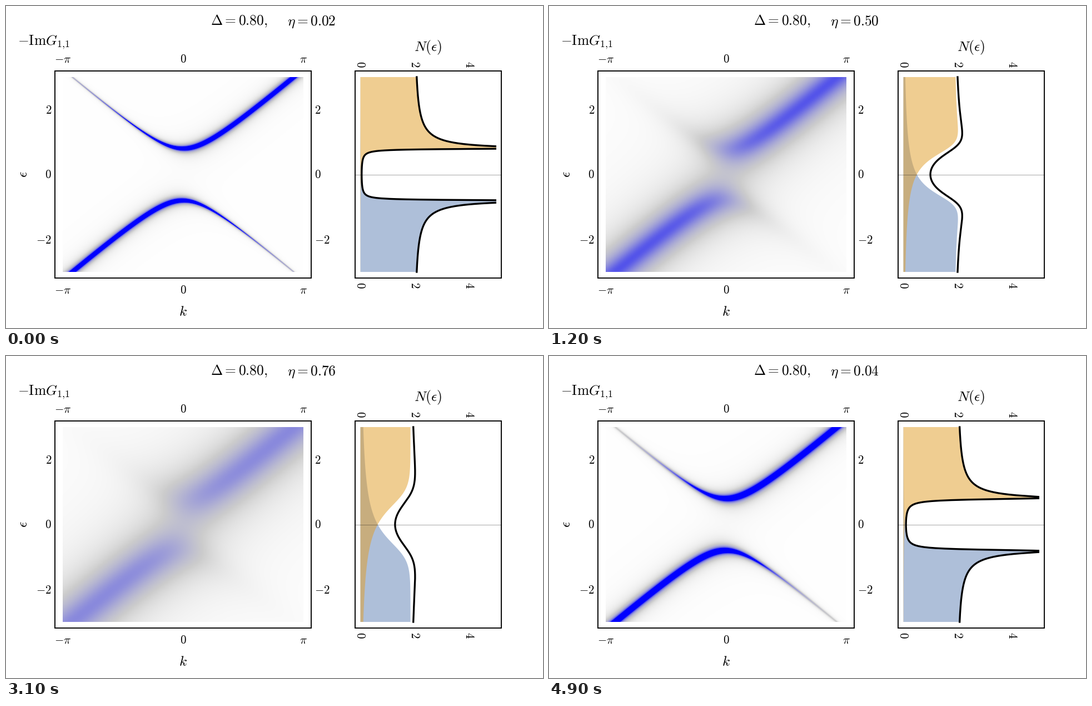
Write a matplotlib script that moves like this. It is 966x580 px and loops after 5000 ms.

```python
import numpy as np
import matplotlib.pyplot as plt
from matplotlib.animation import FuncAnimation
from matplotlib.patches import Polygon, Rectangle

plt.rcParams["mathtext.fontset"] = "cm"

W, H, DPI = 966, 580, 100
PT = 72 / DPI                      # points per pixel
FRAMES, INTERVAL = 50, 100
DELTA = 0.8
K_CUT = 3 * np.pi                  # momentum cutoff of the density of states

# pixel geometry
MAP_L, MAP_R, TOP, BOTTOM = 102, 535, 128, 479
MID = (TOP + BOTTOM) / 2
E_SCALE = (BOTTOM - TOP) / 6
DOS_X0, DOS_SCALE, DOS_MAX = 637.5, 48.9, 5

BLUE = (0.368, 0.507, 0.710)
ORANGE = (0.881, 0.611, 0.142)


def eta_at(i):
    return 0.02 + 0.04 * i if i < 25 else 1.0 - 0.04 * (i - 25)


# momentum / energy grid, one sample per pixel
cols, rows = MAP_R - MAP_L, BOTTOM - TOP
k_map = ((np.arange(cols) + 0.5) / cols * 2 - 1) * np.pi
e_map = (3 - (np.arange(rows) + 0.5) / E_SCALE)[:, None]

energies = np.linspace(-3, 3, 801)
dk = K_CUT / 2000
band = np.hypot((np.arange(2000) + 0.5) * dk, DELTA)
detuning2 = (energies[:, None] - band) ** 2


def spectral_image(eta):
    z = e_map + 1j * eta
    a = -((z + k_map) / (z ** 2 - k_map ** 2 - DELTA ** 2)).imag
    stops = [0, 0.45, 3]
    grey = np.interp(a, stops, [1, 0.8, 0])
    blue = np.interp(a, stops, [1, 0.8, 1])
    return np.dstack([grey, grey, blue])


def upper_band_dos(eta):
    return 2 * dk / np.pi * (eta / (detuning2 + eta ** 2)).sum(axis=1)


def dos_points(density):
    return np.column_stack([DOS_X0 + DOS_SCALE * density,
                            MID - E_SCALE * energies])


def fill_points(density):
    edge = dos_points(density)
    return np.vstack([[DOS_X0, BOTTOM], edge, [DOS_X0, TOP]])


fig = plt.figure(figsize=(W / DPI, H / DPI), dpi=DPI, facecolor="white")
ax = fig.add_axes([0, 0, 1, 1])


def label(x, y, text, size=21, ha="center", rotation=0):
    return ax.text(x, y, f"${text}$", fontsize=size * PT, ha=ha,
                   va="baseline", rotation=rotation, rotation_mode="anchor")


image = ax.imshow(spectral_image(eta_at(0)), interpolation="nearest",
                  extent=(MAP_L, MAP_R, BOTTOM, TOP), aspect="auto")
ax.set_xlim(0, W)
ax.set_ylim(H, 0)
ax.axis("off")

# everything in the right panel is cut off at the largest density
window = Rectangle((600, 100), DOS_X0 + DOS_SCALE * DOS_MAX + 0.3 - 600, 400,
                   transform=ax.transData)


def add_fill(color):
    patch = Polygon([[0, 0], [1, 0], [1, 1]], facecolor=color, alpha=0.5,
                    linewidth=0, zorder=2)
    ax.add_patch(patch)
    patch.set_clip_path(window)
    return patch


lower_fill = add_fill(BLUE)
upper_fill = add_fill(ORANGE)
ax.plot([628, 891], [MID, MID], color="black", alpha=0.34, lw=PT, zorder=3)
curve, = ax.plot([], [], color="black", lw=3.3 * PT, zorder=4,
                 solid_capstyle="projecting", solid_joinstyle="round")
curve.set_clip_path(window)

for left, right in [(88, 549), (627.5, 891)]:
    ax.add_patch(Rectangle((left, 117), right - left, 373, fill=False,
                           edgecolor="black", lw=1.9 * PT, zorder=5))

# labels
label(368, 34.5, r"\Delta = 0.80,", 25.5, "left")
eta_text = label(506, 34.5, "", 25.5, "left")
label(21, 70.5, r"-\mathrm{Im}G_{1{,}1}", 25.5, "left")
label(759, 81, r"N(\epsilon)", 25.5)
label(318, 558, "k", 25.5)
label(37.5, MID, r"\epsilon", 25.5, rotation=90)

for baseline in (102, 518):
    for x, text in [(102, r"-\pi"), (318.5, "0"), (534.5, r"\pi")]:
        label(x, baseline, text)
for value in (-2, 0, 2):
    y = MID - E_SCALE * value + 7
    label(82, y, value, ha="right")
    label(555, y, value, ha="left")
for value in (0, 2, 4):
    for y in (105, 503):
        label(DOS_X0 + DOS_SCALE * value - 6.5, y, value, rotation=-90)


def update(i):
    eta = eta_at(i)
    image.set_data(spectral_image(eta))
    upper = upper_band_dos(eta)
    lower = upper[::-1]
    upper_fill.set_xy(fill_points(upper))
    lower_fill.set_xy(fill_points(lower))
    curve.set_data(*dos_points(upper + lower).T)
    eta_text.set_text(rf"$\eta = {eta:.2f}$")
    return image, upper_fill, lower_fill, curve, eta_text


anim = FuncAnimation(fig, update, frames=FRAMES, interval=INTERVAL,
                     repeat=True, repeat_delay=0, blit=False)
plt.show()
```
